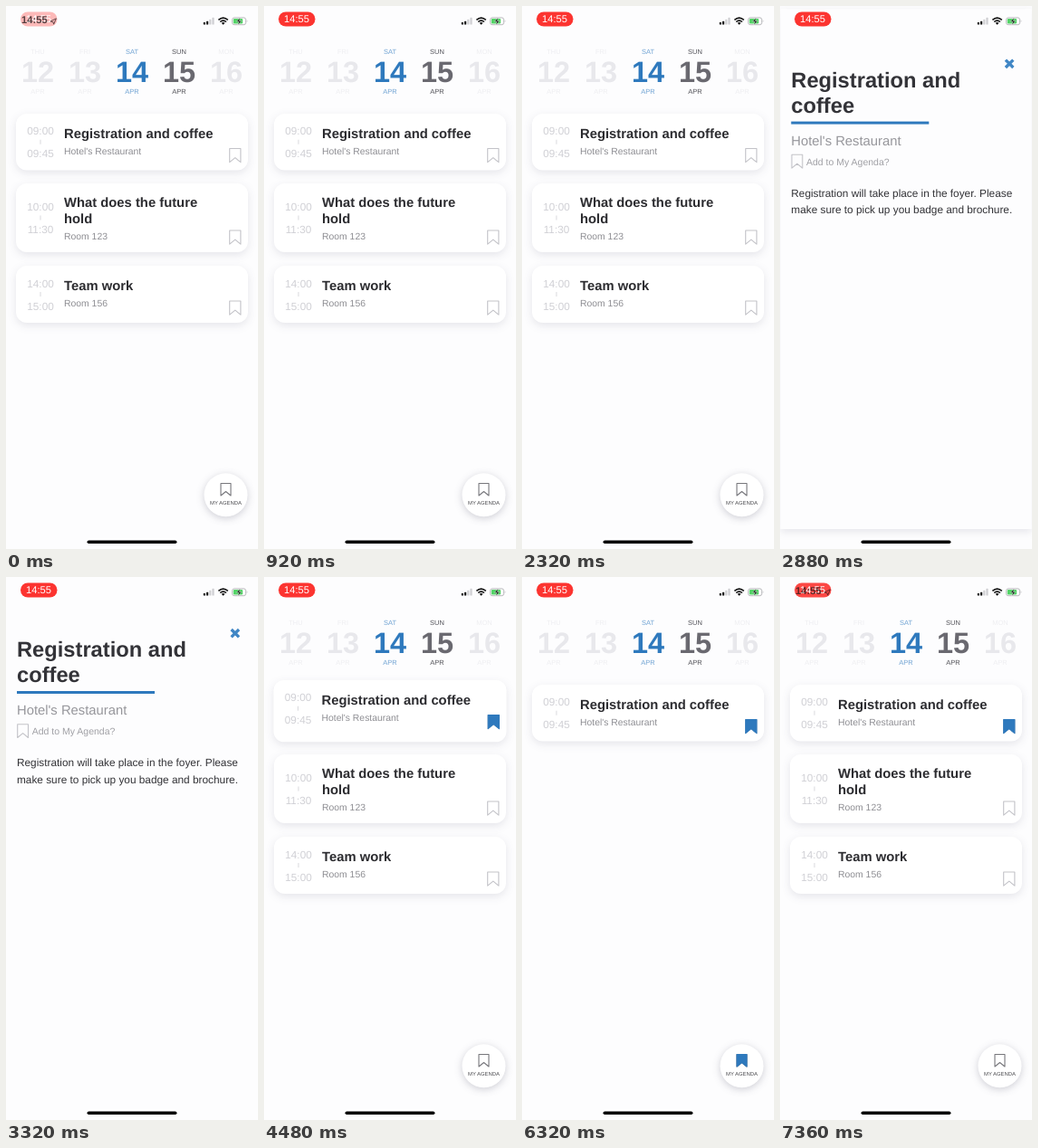
Recreate the animation shown at these times as an HTML page. Size 278 px wide and 600 px high, loop 7.4 s.

```html
<!DOCTYPE html>
<html lang="en">
<head>
<meta charset="utf-8">
<title>Agenda</title>
<style>
  html, body { margin: 0; width: 100%; height: 100%; overflow: hidden; background: #fdfdfe; }
  svg { display: block; width: 278px; height: 600px; }
  text { font-family: "Liberation Sans", Arial, sans-serif; text-rendering: geometricPrecision; }
  .bold { font-weight: 700; }
  .mid { text-anchor: middle; }
  .box { filter: drop-shadow(0 3px 5px rgba(40, 40, 70, .11)); }
</style>
</head>
<body>
<svg id="stage" viewBox="0 0 278 600"></svg>
<script>
const LOOP = 7400;
const BLUE = [46, 121, 189], SOFT_BLUE = [112, 163, 211];
const DARK = [106, 105, 112], SMALL_DARK = [82, 82, 88];
const FAINT = 'rgb(232,232,236)', FAINT_SMALL = 'rgb(238,238,241)';
const COLUMN = 52;

const clamp = v => Math.max(0, Math.min(1, v));
const ramp = (t, start, length) => clamp((t - start) / length);
const easeOut = u => 1 - (1 - u) ** 3;
const easeInOut = u => u < .5 ? 4 * u ** 3 : 1 - (2 - 2 * u) ** 3 / 2;
const rgb = c => `rgb(${c.map(Math.round)})`;
const mix = (a, b, k) => rgb(a.map((v, i) => v + (b[i] - v) * k));

const stage = document.getElementById('stage');

function set(node, attrs) {
  for (const key in attrs) node.setAttribute(key, attrs[key]);
  return node;
}
function add(parent, tag, attrs = {}) {
  const node = document.createElementNS('http://www.w3.org/2000/svg', tag);
  return parent.appendChild(set(node, attrs));
}
function write(parent, content, x, y, size, fill, kind = '') {
  const node = add(parent, 'text', { x, y, 'font-size': size, fill, class: kind });
  node.textContent = content;
  return node;
}

// Outline with a solid version above it whose opacity can be animated
function bookmark(parent, x, y, w, h, stroke) {
  const d = `M${x} ${y}h${w}v${h}l${-w / 2} ${-h * .33}l${-w / 2} ${h * .33}z`;
  const shape = { d, 'stroke-width': 1.1, 'stroke-linejoin': 'round' };
  add(parent, 'path', { ...shape, fill: 'none', stroke });
  return add(parent, 'path', { ...shape, fill: rgb(BLUE), stroke: rgb(BLUE), opacity: 0 });
}

function card(parent, top, height, [from, to, lines, place]) {
  const group = add(parent, 'g');
  const box = add(group, 'rect', { x: 11, y: top, width: 256, height, rx: 12, fill: '#fff', class: 'box' });
  const content = add(group, 'g');
  const middle = top + height / 2;
  const gray = '#d0d0d5';
  write(content, from, 38, middle - 8, 11.8, gray, 'mid');
  add(content, 'path', { d: `M38 ${middle - 2.5}v5`, stroke: gray, 'stroke-width': .8 });
  write(content, to, 38, middle + 17, 11.8, gray, 'mid');
  lines.forEach((line, i) => write(content, line, 64, top + 27 + i * 18 - (lines.length - 1), 14.8, '#2c2c30', 'bold'));
  write(content, place, 64, top + 45.3 + (lines.length - 1) * 16.5, 10.4, '#8e8e93');
  const mark = add(content, 'g');
  const solid = bookmark(mark, 246.7, top + height - 24, 12.2, 15.2, '#c3c3c8');
  return { group, box, content, mark, solid };
}

const SLOTS = [[119, 62.5], [196, 76], [287, 63]];
function list(parent, entries) {
  const group = add(parent, 'g');
  return { group, cards: entries.map((entry, i) => card(group, ...SLOTS[i], entry)) };
}

// Date strip
const strip = add(stage, 'g');
const days = ['WED', 'THU', 'FRI', 'SAT', 'SUN', 'MON', 'TUE', 'WED'].map((name, i) => {
  const x = 35 + (i - 1) * COLUMN, number = 11 + i;
  return {
    number,
    big: write(strip, number, x, 83.7, 32.5, FAINT, 'bold mid'),
    small: [write(strip, name, x, 52.7, 7.5, FAINT_SMALL, 'mid'), write(strip, 'APR', x, 96.8, 7.5, FAINT_SMALL, 'mid')]
  };
});

// Floating button
const button = add(stage, 'g');
add(button, 'circle', { cx: 242.5, cy: 540.3, r: 24, fill: '#fff', style: 'filter:drop-shadow(0 2px 4px rgba(40,40,70,.22))' });
const buttonMark = bookmark(button, 237, 527.5, 11, 13.5, '#77777c');
write(button, 'MY AGENDA', 242.5, 551, 5.9, '#4c4c50', 'mid');

// Day lists
const sunday = list(stage, [
  ['09:00', '09:45', ['Morning coffee'], "Hotel's Restaurant"],
  ['10:00', '11:30', ['Defining success in our', 'industry'], 'Room 144'],
  ['17:00', '18:00', ['Day 2 round up'], 'Room 101']
]);
const saturday = list(stage, [
  ['09:00', '09:45', ['Registration and coffee'], "Hotel's Restaurant"],
  ['10:00', '11:30', ['What does the future', 'hold'], 'Room 123'],
  ['14:00', '15:00', ['Team work'], 'Room 156']
]);
const hero = saturday.cards[0];
saturday.group.appendChild(hero.group);

// Detail page
const detail = add(stage, 'g');
write(detail, 'Registration and', 12, 88.3, 23.7, '#333338', 'bold');
write(detail, 'coffee', 12, 116.4, 23.7, '#333338', 'bold');
add(detail, 'rect', { x: 12, y: 126, width: 152, height: 3, fill: rgb(BLUE) });
write(detail, "Hotel's Restaurant", 12, 152.4, 14.8, '#96969b');
const detailMark = bookmark(detail, 12.7, 162.7, 11.8, 14.8, '#c3c3c8');
write(detail, 'Add to My Agenda?', 28.7, 174.3, 10.5, '#a0a0a5');
write(detail, 'Registration will take place in the foyer. Please', 12, 209.2, 11.83, '#323236');
write(detail, 'make sure to pick up you badge and brochure.', 12, 227.8, 11.83, '#323236');
add(detail, 'path', { d: 'M248.6 58l8.4 8.4m0-8.4l-8.4 8.4', stroke: '#4086c5', 'stroke-width': 3.3 });

// Status bar and home indicator
const pill = add(stage, 'g');
add(pill, 'rect', { x: 16, y: 6.5, width: 40.5, height: 16, rx: 8, fill: '#fc3430' });
write(pill, '14:55', 36, 18.4, 11.2, '#fff', 'mid');
const clock = add(stage, 'g');
write(clock, '14:55', 31.3, 18.9, 11.2, '#1c1416', 'bold mid');
add(clock, 'path', { d: 'M49 17l6.4-3.2-2.8 6.4-.7-2.7z', fill: 'none', stroke: '#1c1416', 'stroke-width': .9 });

[2.6, 3.8, 5.8, 7.8].forEach((h, i) =>
  add(stage, 'rect', { x: 217.8 + i * 3.2, y: 20.6 - h, width: 2.2, height: h, rx: .6, fill: i < 2 ? '#111' : '#cfcfd2' }));
const wifi = add(stage, 'g', { fill: 'none', stroke: '#111', 'stroke-width': 1.6 });
add(wifi, 'path', { d: 'M234.4 15.4q5.2-4.6 10.4 0M236.2 17.5q3.4-2.9 6.8 0' });
add(wifi, 'path', { d: 'M237.7 18.8q1.9-1.6 3.8 0l-1.9 2z', fill: '#111', stroke: 'none' });
add(stage, 'rect', { x: 249.6, y: 12.9, width: 15, height: 7.8, rx: 2.3, fill: '#fff', stroke: '#a6a6aa', 'stroke-width': .8 });
add(stage, 'rect', { x: 250.8, y: 14.1, width: 10.3, height: 5.4, rx: 1.2, fill: '#52d366' });
add(stage, 'path', { d: 'M265.8 15.6q1.3 1.2 0 2.5z', fill: '#a6a6aa' });
add(stage, 'path', { d: 'M258.4 12.7l-4 4.6h2.4l-1 3.8 4-4.7h-2.4z', fill: '#111', stroke: '#fff', 'stroke-width': .4 });
add(stage, 'rect', { x: 89.5, y: 590.4, width: 99, height: 3.6, rx: 1.8, fill: '#000' });

function drawStrip(shift) {
  set(strip, { transform: `translate(${-COLUMN * shift} 0)` });
  for (const day of days) {
    if (day.number !== 14 && day.number !== 15) continue;
    const chosen = day.number === 14 ? 1 - shift : shift;
    set(day.big, { fill: mix(DARK, BLUE, chosen) });
    day.small.forEach(node => set(node, { fill: mix(SMALL_DARK, SOFT_BLUE, chosen) }));
  }
}

function drawHero(open) {
  const top = 119 * (1 - open), left = 11 * (1 - open);
  const bottom = 181.5 + 418.5 * open * open;
  set(hero.box, { x: left, y: top, width: 278 - 2 * left, height: bottom - top, rx: 12 * (1 - open), fill: open > .9 ? '#fdfdfe' : '#fff' });
  set(hero.content, { transform: `translate(${-11 * open} ${-119 * open})`, opacity: 1 - ramp(open, .1, .4) });
  set(hero.mark, { transform: `translate(${22 * open} 0)` });
  set(detail, { transform: `translate(${11 * (1 - open)} ${60 * (1 - open)})`, opacity: ramp(open, .4, .5) });
}

function draw(t) {
  const shift = easeInOut(ramp(t, 900, 540)) - easeInOut(ramp(t, 1700, 540));
  drawStrip(shift);
  set(saturday.group, { opacity: 1 - shift });
  set(sunday.group, { opacity: shift });

  drawHero(easeOut(ramp(t, 2460, 600)) - easeOut(ramp(t, 4080, 615)));
  const saved = ramp(t, 3560, 120);
  set(detailMark, { opacity: saved });
  set(hero.solid, { opacity: saved });

  const filtered = easeInOut(ramp(t, 5320, 360)) - easeInOut(ramp(t, 6400, 280));
  saturday.cards.slice(1).forEach(({ group }) => set(group, { opacity: 1 - filtered }));
  set(buttonMark, { opacity: ramp(t, 5300, 200) - ramp(t, 6500, 240) });
  const press = Math.sin(Math.PI * ramp(t, 5230, 220)) + Math.sin(Math.PI * ramp(t, 6320, 220));
  set(button, { transform: `translate(242.5 540.3) scale(${1 - .05 * press}) translate(-242.5 -540.3)` });

  // The recording pill fades in at the start and out at the very end
  set(pill, { opacity: .33 + .67 * ramp(t, 0, 240) - .3 * ramp(t, 7300, 180) });
  set(clock, { opacity: .75 * (1 - ramp(t, 0, 200)) + .7 * ramp(t, 7280, 80) });
}

const start = performance.now();
function tick() {
  draw((performance.now() - start) % LOOP);
  requestAnimationFrame(tick);
}
draw(0);
requestAnimationFrame(tick);
</script>
</body>
</html>
```
